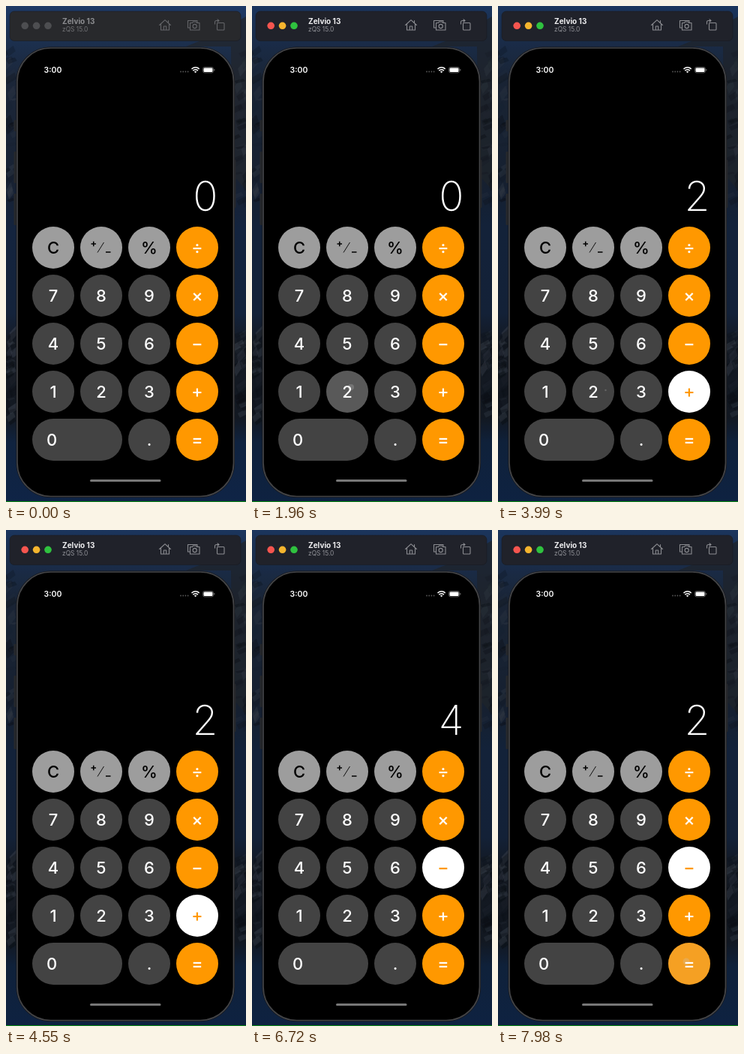
An HTML page for the animation above (8000 ms loop, 320x661 px).

```html
<!DOCTYPE html>
<html lang="en">
<head>
<meta charset="utf-8">
<title>Calculator</title>
<style>
html, body { margin: 0; width: 100%; height: 100%; overflow: hidden; background: #000; }
svg { display: block; width: 320px; height: 661px; font-family: Inter, Roboto, sans-serif; }
.bar { --fill: #28292c; --title: #8c8d90; --sub: #737477; --icon: #65666a; --r: #4d4e51; --y: #4d4e51; --g: #4d4e51; }
.bar.on { --fill: #20222a; --title: #efeff1; --sub: #929399; --icon: #8b8c91; --r: #f6554f; --y: #f5b52e; --g: #2fc23f; }
.icon { fill: none; stroke: var(--icon); stroke-width: 1.1; stroke-linejoin: round; stroke-linecap: round; }
.key { font-size: 22px; font-weight: 500; text-anchor: middle; }
.op { font-size: 23px; }
#display { font-size: 55px; font-weight: 200; text-anchor: end; fill: #fff; }
</style>
</head>
<body>
<svg viewBox="0 0 320 661">
  <defs>
    <linearGradient id="sky" x2="0" y2="1">
      <stop offset="0" stop-color="#1e3a66"/>
      <stop offset=".07" stop-color="#1c304f"/>
      <stop offset=".15" stop-color="#1b2638"/>
      <stop offset=".36" stop-color="#182233"/>
      <stop offset=".45" stop-color="#14243e"/>
      <stop offset=".62" stop-color="#14233b"/>
      <stop offset=".68" stop-color="#151a23"/>
      <stop offset=".83" stop-color="#131922"/>
      <stop offset=".88" stop-color="#10233f"/>
      <stop offset="1" stop-color="#0f2446"/>
    </linearGradient>
  </defs>

  <rect width="320" height="661" fill="url(#sky)"/>
  <path d="M240 54L275 40L320 14V245L302 225L300 54Z" fill="#22262d" opacity=".75"/>
  <g id="rocks"></g>
  <rect id="dim" width="320" height="661" fill="#0c1018" opacity="0"/>
  <rect y="660" width="320" height="1" fill="#0c8a14"/>

  <g class="bar" id="bar">
    <rect x="5" y="7" width="308" height="39.500" rx="6" fill="var(--fill)" stroke="#15181e" stroke-opacity=".6" stroke-width=".8"/>
    <circle cx="25.200" cy="26.300" r="4.800" fill="var(--r)"/>
    <circle cx="40.600" cy="26.300" r="4.800" fill="var(--y)"/>
    <circle cx="56" cy="26.300" r="4.800" fill="var(--g)"/>
    <text x="75" y="24" font-size="10" font-weight="700" fill="var(--title)">Zelvio 13</text>
    <text x="75" y="34.200" font-size="8.400" fill="var(--sub)">zQS 15.0</text>
    <g class="icon">
      <path d="M204.500 25.500L212 18.700L219.500 25.500M206.500 24V32H217.500V24M210.300 32V27H213.700V32M216.500 22V19.500"/>
      <path d="M245 29H242.500V19.500H255V21.500"/>
      <path d="M245.500 22.500H248.500L249.500 21H253.500L254.500 22.500H258V32H245.500Z"/>
      <circle cx="251.700" cy="27" r="2.600"/>
      <rect x="281.500" y="22.500" width="9.500" height="9.500" rx="1"/>
      <path d="M278.500 24V21.500Q278.500 19.500 280.500 19.500H284M282 17.800L284 19.500L282 21.200"/>
    </g>
  </g>

  <g fill="#26282c">
    <rect x="10.500" y="152" width="4" height="15" rx="1"/>
    <rect x="10.500" y="194" width="4" height="42" rx="1"/>
    <rect x="10.500" y="250" width="4" height="42" rx="1"/>
    <rect x="303" y="205" width="3.500" height="64" rx="1"/>
  </g>
  <rect x="13.500" y="54.500" width="291.500" height="600.500" rx="46" fill="#141416"/>
  <rect x="15" y="56" width="288.500" height="597.500" rx="44.500" fill="#000" stroke="#434447" stroke-width="1.700"/>

  <g fill="#fff">
    <text x="50.500" y="89" font-size="10.500" font-weight="600">3:00</text>
    <g fill="#555">
      <circle cx="233" cy="87.500" r=".9"/><circle cx="236.200" cy="87.500" r=".9"/>
      <circle cx="239.400" cy="87.500" r=".9"/><circle cx="242.600" cy="87.500" r=".9"/>
    </g>
    <path d="M247.500 84Q252.600 79.500 257.700 84M249.300 86.200Q252.600 83.300 255.900 86.200" fill="none" stroke="#fff" stroke-width="1.600"/>
    <path d="M250.900 87.400Q252.600 86 254.300 87.400L252.600 89.300Z"/>
    <rect x="262.500" y="81.500" width="14" height="7.500" rx="2.200" fill="none" stroke="#777" stroke-width=".7"/>
    <rect x="263.500" y="82.500" width="12" height="5.500" rx="1.300"/>
    <rect x="277.300" y="84" width="1" height="2.500" rx=".5" fill="#777"/>
  </g>
  <rect x="112" y="631" width="94.500" height="3" rx="1.500" fill="#777"/>
  <text id="display" x="282.500" y="273.300">0</text>
  <g id="keys"></g>
</svg>

<script>
const NS = 'http://www.w3.org/2000/svg', LOOP = 8000;
const $ = id => document.getElementById(id);
const clamp = v => Math.max(0, Math.min(1, v));

function add(parent, tag, attrs, text) {
  const el = document.createElementNS(NS, tag);
  for (const k in attrs) el.setAttribute(k, attrs[k]);
  if (text) el.textContent = text;
  return parent.appendChild(el);
}

let seed = 11;
const rand = () => (seed = seed * 16807 % 2147483647) / 2147483647;

// slanted shards along both edges of the wallpaper
function addRocks(count, top, bottom, opacity) {
  for (let i = 0; i < count; i++) {
    const x = i % 2 ? 300 + rand() * 16 : rand() * 12 - 6;
    const y = top + rand() * (bottom - top), w = 5 + rand() * 9, h = 2 + rand() * 9;
    add($('rocks'), 'path', {
      d: `M${x} ${y}l${w} ${-h}l3 ${h}l${-w} ${h}z`,
      fill: rand() < .6 ? '#0b0e14' : '#3a414c', opacity: opacity * rand()
    });
  }
}
addRocks(60, 60, 260, .45);
addRocks(70, 430, 555, .6);

const GREY = '#434343', LIGHT = '#9d9d9d', ORANGE = '#ff9800';
const keys = {};

function addKey(label, col, row) {
  const cx = 63 + col * 64, cy = 322 + row * 64, op = col === 3;
  const wide = label === '0';
  const shape = { x: cx - 28, y: cy - 28, width: wide ? 120 : 56, height: 56, rx: 28 };
  const fill = op ? ORANGE : row ? GREY : LIGHT;
  const g = add($('keys'), 'g', {});
  const clip = add(g, 'clipPath', { id: `c${col}${row}` });
  add(clip, 'rect', shape);
  const face = add(g, 'rect', { ...shape, fill });
  const glow = add(g, 'rect', { ...shape, fill: '#c8c8c8', opacity: 0 });
  const splash = add(g, 'circle', { r: 0, fill: '#c8c8c8', opacity: 0, 'clip-path': `url(#c${col}${row})` });
  const ink = row || op ? '#fff' : '#000';
  if (label === '±') {
    add(g, 'path', { d: 'M113.500 317H120M116.750 313.800V320.200M133 328H139.500', stroke: ink, 'stroke-width': 1.5 });
    add(g, 'path', { d: 'M122 328.500L130.500 315', stroke: ink, 'stroke-width': .9 });
  }
  const text = add(g, 'text', {
    x: wide ? cx - 2 : cx, y: cy + (op ? 7.5 : 8), class: op ? 'key op' : 'key', fill: ink
  }, label === '±' ? '' : label);
  keys[label] = { face, glow, splash, text };
}

['C±%÷', '789×', '456−', '123+'].forEach((line, row) =>
  [...line].forEach((label, col) => addKey(label, col, row)));
addKey('0', 0, 4);
addKey('.', 2, 4);
addKey('=', 3, 4);

// key, touch point, start and hold time
const presses = [
  ['2', 132, 508, 1900, 120],
  ['+', 256, 511, 2640, 120],
  ['2', 143.5, 512, 3972, 300],
  ['=', 252, 575, 4890, 300],
  ['−', 256, 449, 6450, 60],
  ['2', 134, 510, 7050, 80],
  ['=', 251, 575, 7915, 120]
];

function showPress([label, x, y, start, hold], t) {
  const age = t - start, after = Math.max(0, age - hold);
  if (age < 0 || after > 200) return;
  const { glow, splash } = keys[label], fade = 1 - after / 200;
  glow.setAttribute('opacity', .25 * clamp((age - 20) / 65) * fade);
  splash.setAttribute('cx', x);
  splash.setAttribute('cy', y);
  splash.setAttribute('r', Math.min(age, hold) * .067 + after * .25);
  splash.setAttribute('opacity', .25 * fade);
}

function select(label, on) {
  keys[label].face.setAttribute('fill', on ? '#fff' : ORANGE);
  keys[label].text.setAttribute('fill', on ? ORANGE : '#fff');
}

function draw(now) {
  const t = now % LOOP;
  $('bar').classList.toggle('on', t >= 420);
  $('dim').setAttribute('opacity', .12 * clamp((t - 350) / 350));
  $('display').textContent = t < 2020 ? '0' : t < 5190 ? '2' : t < 7130 ? '4' : '2';
  select('+', t >= 2760 && t < 5190);
  select('−', t >= 6510);
  for (const label of ['2', '+', '−', '=']) {
    keys[label].glow.setAttribute('opacity', 0);
    keys[label].splash.setAttribute('opacity', 0);
  }
  presses.forEach(p => showPress(p, t));
}

const begin = performance.now();
function tick() {
  draw(performance.now() - begin);
  requestAnimationFrame(tick);
}
tick();
</script>
</body>
</html>
```
